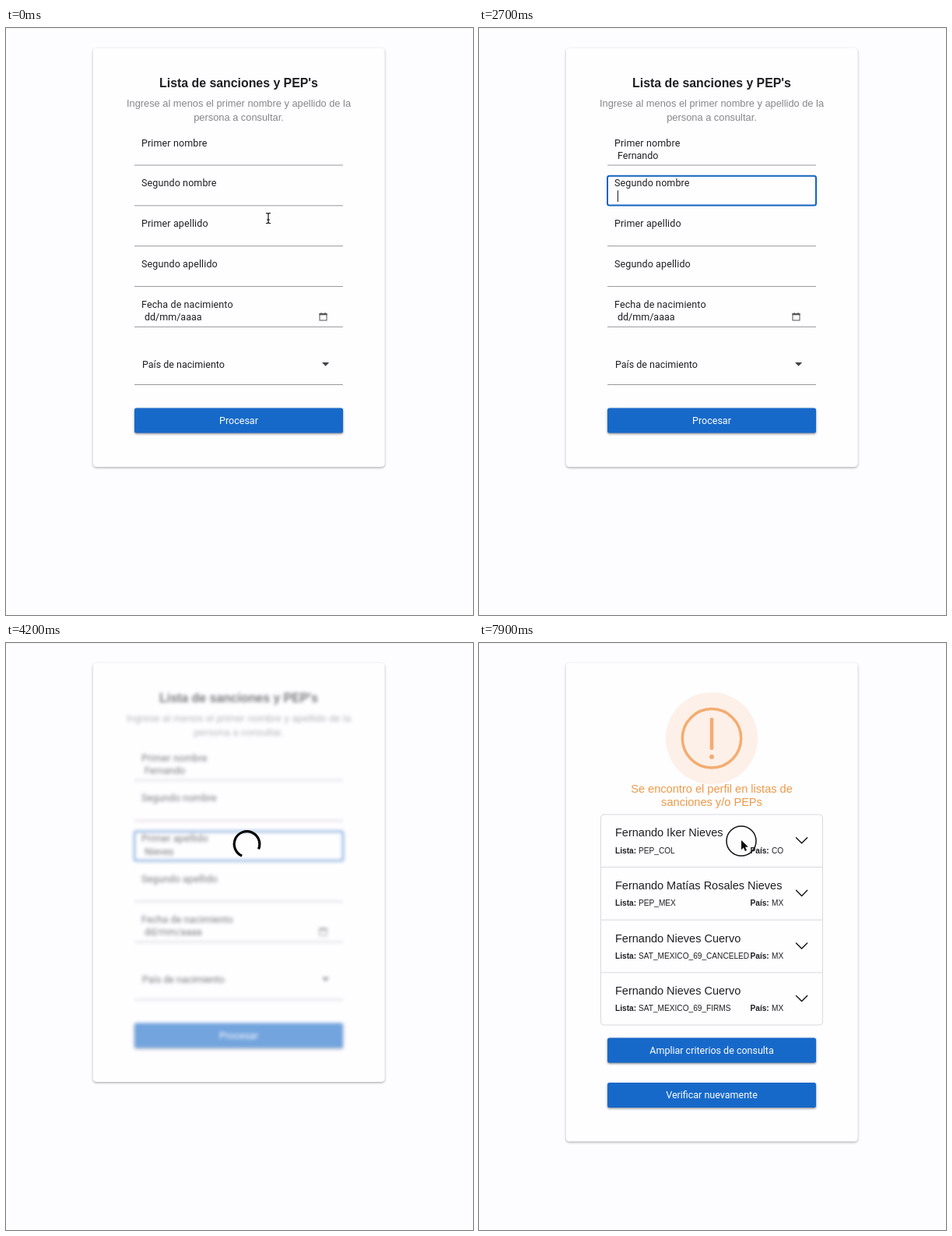
An HTML page with a canvas that plays this animation: 600 px wide and 753 px high, repeating every 8000 ms.

```html
<!DOCTYPE html>
<html lang="es">
<head>
<meta charset="utf-8">
<title>Lista de sanciones</title>
<style>
html, body { margin: 0; width: 100%; height: 100%; overflow: hidden; background: #fdfcff; }
canvas { display: block; width: 600px; height: 753px; }
</style>
</head>
<body>
<canvas id="stage"></canvas>
<script>
const W = 600, H = 753, LOOP = 8000, STEP = 100;
const BG = '#fdfcff', BLUE = '#1769c9', INK = '#1f1f21', ORANGE = '#f4ac70';
const SANS = '"Liberation Sans", Arial, sans-serif';
const ROBOTO = '12.5px Roboto, sans-serif';
const INTER = 'Inter, sans-serif';
const PITCH = 51.85;

const dpr = window.devicePixelRatio || 1;
const stage = document.getElementById('stage');
const sheet = document.createElement('canvas');
for (const c of [stage, sheet]) {
  c.width = W * dpr;
  c.height = H * dpr;
  c.getContext('2d').scale(dpr, dpr);
}
const main = stage.getContext('2d');
let g = main;

const first = { word: 'Fernando', keys: [1600, 1700, 1900, 2000, 2100, 2200, 2400, 2500], focus: 700 };
const last = { word: 'Nieves', keys: [3300, 3500, 3600, 3700, 3800, 3900], focus: 2900 };
const T = { click: 500, list: 800, second: 2700, sideList: 3000, load: 4100, result: 6300, arrow: 6700, press: 7800 };

const people = [
  ['Fernando', 'Fernando Nieves'],
  ['Tomás', 'Tomás Peñalver'],
  ['Raúl', 'Raúl Nieves'],
  ['Fer', 'Fer Nieves'],
  ['Mariela', 'Mariela Cortés'],
  ['Fito', 'Fito Olmedo'],
  ['Antonella', 'Antonella Prieto'],
  ['Ramiro', 'Ramiro Salazar'],
  ['Raúl Fernando', 'Raúl Fernando Nieves El...']
];
const byLetter = [people[0], people[3], people[5]];
const surname = [['Nilson', 'Nilson Vargas']];

const hits = [
  ['Fernando Iker Nieves', 'PEP_COL', 'CO'],
  ['Fernando Matías Rosales Nieves', 'PEP_MEX', 'MX'],
  ['Fernando Nieves Cuervo', 'SAT_MEXICO_69_CANCELED', 'MX'],
  ['Fernando Nieves Cuervo', 'SAT_MEXICO_69_FIRMS', 'MX']
];

function text(s, x, y, font, color, align = 'left', spacing = 0) {
  g.font = font;
  g.fillStyle = color;
  g.textAlign = align;
  g.letterSpacing = spacing + 'px';
  g.fillText(s, x, y);
}

function line(points, color, width, cap = 'butt') {
  g.beginPath();
  points.forEach(([x, y]) => g.lineTo(x, y));
  g.strokeStyle = color;
  g.lineWidth = width;
  g.lineCap = cap;
  g.stroke();
}

function box(x, y, w, h, r) {
  g.beginPath();
  g.roundRect(x, y, w, h, r);
}

function poly(points, color) {
  g.beginPath();
  points.forEach(([x, y]) => g.lineTo(x, y));
  g.closePath();
  g.fillStyle = color;
  g.fill();
}

function disc(x, y, r, color) {
  g.beginPath();
  g.arc(x, y, r, 0, 7);
  g.fillStyle = color;
  g.fill();
}

function ring(x, y, r, color, width) {
  g.beginPath();
  g.arc(x, y, r, 0, 7);
  g.strokeStyle = color;
  g.lineWidth = width;
  g.stroke();
}

function shadow(color, blur, dy) {
  g.shadowColor = color;
  g.shadowBlur = blur * dpr;
  g.shadowOffsetY = dy * dpr;
}

function raised(x, y, w, h, r, fill, alpha) {
  g.save();
  shadow(`rgba(0,0,0,${alpha})`, 3, 1.3);
  box(x, y, w, h, r);
  g.fillStyle = fill;
  g.fill();
  g.restore();
}

function button(label, y) {
  raised(165, y, 268, 32, 2.5, BLUE, 0.45);
  text(label, 299, y + 20, ROBOTO, '#fff', 'center');
}

const typed = (f, t) => f.word.slice(0, f.keys.filter(k => k <= t).length);

function caretOn(f, t) {
  const since = Math.max(f.focus, ...f.keys.filter(k => k <= t));
  return (t - since) % 1000 < 500;
}

function focusBox(row) {
  box(165, 138 + row * PITCH, 268, 37.6, 2.5);
  g.strokeStyle = '#1263bd';
  g.lineWidth = 2;
  g.stroke();
}

function value(f, row, t, active) {
  const s = typed(f, t), y = 168 + row * PITCH;
  text(s, 178, y, ROBOTO, INK);
  if (!active || !caretOn(f, t)) return;
  const x = 178.4 + g.measureText(s).width;
  line([[x, y - 11.5], [x, y + 3]], '#111', 1);
}

function form(t) {
  text("Lista de sanciones y PEP's", 299, 76, 'bold 15.87px ' + SANS, INK, 'center');
  text('Ingrese al menos el primer nombre y apellido de la', 299, 101.4, '12.83px ' + SANS, '#868588', 'center');
  text('persona a consultar.', 299, 118.9, '12.83px ' + SANS, '#868588', 'center');

  const active = t < first.focus ? -1 : t < T.second ? 0 : t < last.focus ? 1 : 2;
  ['Primer nombre', 'Segundo nombre', 'Primer apellido', 'Segundo apellido', 'Fecha de nacimiento'].forEach((s, i) => {
    const y = i * PITCH;
    if (i === active) focusBox(i);
    else line([[165, 176 + y], [433, 176 + y]], '#99989b', 1);
    text(s, 174, 151.6 + y, ROBOTO, INK, 'left', 0.12);
  });
  value(first, 0, t, active === 0);
  value(last, 2, t, active === 2 && t < T.load);
  if (active === 1) line([[178.4, 208.4], [178.4, 223]], '#111', 1);

  text('dd/mm/aaaa', 178, 375, ROBOTO, INK);
  g.strokeStyle = '#555';
  g.lineWidth = 1;
  g.strokeRect(403, 366.5, 9, 8.5);
  line([[402.5, 367.3], [412.5, 367.3]], '#555', 2);
  line([[405, 365], [405, 367]], '#555', 1.2);
  line([[410, 365], [410, 367]], '#555', 1.2);

  text('País de nacimiento', 175, 435.8, ROBOTO, INK);
  poly([[406, 429], [415.2, 429], [410.6, 433.8]], '#404042');
  line([[165, 457.5], [433, 457.5]], '#99989b', 1);
  button('Procesar', 487.5);
}

function person(x, y) {
  const c = '#a0a1a5';
  ring(x, y, 5.5, c, 1.2);
  disc(x, y - 1.5, 2, c);
  g.beginPath();
  g.ellipse(x, y + 3.6, 3.6, 2, 0, Math.PI, 0);
  g.fillStyle = c;
  g.fill();
}

function popup(x, y, w, h, rows, side) {
  const fill = '#212225', end = y + h;
  g.save();
  shadow('rgba(0,0,0,.3)', 9, 3);
  box(x, y, w, h, 4);
  g.fillStyle = fill;
  g.fill();
  g.restore();
  poly(side ? [[x + 1, y + 11], [x - 7, y + 19], [x + 1, y + 27]]
            : [[x + 10, y + 1], [x + 18.5, y - 7], [x + 27, y + 1]], fill);

  g.save();
  g.beginPath();
  g.rect(x, y, w, h - 44);
  g.clip();
  rows.forEach(([name, full], i) => {
    const top = y + i * PITCH;
    person(x + 18, top + 29.3);
    text(name, x + 36, top + 24.2, '11.7px ' + INTER, '#f2f2f4');
    text(full, x + 36, top + 43, '10.7px ' + INTER, '#97989c');
  });
  g.restore();
  line([[x, end - 40], [x + w, end - 40]], '#3a3b3f', 1);
  disc(x + 18, end - 19.8, 6, '#97989c');
  text('Administrar...', x + 36, end - 15.8, '11.4px ' + INTER, '#97989c');
}

function lists(t) {
  const a = typed(first, t), b = typed(last, t);
  if (t >= T.list && t < T.second) {
    if (!a) popup(253.5, 183, 200, 498, people);
    else {
      const rows = byLetter.filter(p => p[0].startsWith(a));
      popup(253.5, 183, 150.5, 47.4 + rows.length * PITCH, rows);
    }
  }
  if (t >= T.sideList && t < T.load) {
    if (!b) popup(440, 241, 200, 498, people, true);
    else if (b.length < 3) popup(253.5, 287, 128.5, 99, surname);
  }
}

function spinner(t) {
  const a = (185 + (t - 5400) * 0.36) * Math.PI / 180;
  g.beginPath();
  g.arc(309.5, 258, 16.3, a, a + Math.PI * 1.5);
  g.strokeStyle = '#000';
  g.lineWidth = 3.2;
  g.lineCap = 'butt';
  g.stroke();
}

function loading(t) {
  g = sheet.getContext('2d');
  g.clearRect(0, 0, W, H);
  form(t);
  g = main;
  g.save();
  g.filter = `blur(${2.3 * dpr}px)`;
  g.globalAlpha = 0.6;
  g.drawImage(sheet, 0, 0, W, H);
  g.restore();
  spinner(t);
}

function alertIcon(t) {
  const x = 299, y = 122.3;
  const r = 39 + (t - 7100) * 0.025;
  const alpha = 0.2 - (t - 7100) * 0.00006;
  disc(x, y, r, `rgba(246,170,105,${Math.min(0.24, alpha)})`);
  ring(x, y, 37.7, ORANGE, 3.5);
  line([[x, 98], [x, 135]], ORANGE, 4.6, 'round');
  disc(x, 146, 3, ORANGE);
}

function results(t) {
  alertIcon(t);
  text('Se encontro el perfil en listas de', 299, 191.5, '14.6px ' + SANS, '#ec9a48', 'center');
  text('sanciones y/o PEPs', 299, 208.6, '14.6px ' + SANS, '#ec9a48', 'center');

  box(156.5, 220, 285, 270, 4);
  g.strokeStyle = '#d8dade';
  g.lineWidth = 1;
  g.stroke();
  hits.forEach(([name, list, land], i) => {
    const y = 220 + i * 67.6;
    if (i) line([[156.5, y], [441.5, y]], '#d8dade', 1);
    const bold = 'bold 10.15px ' + SANS, thin = '10.15px ' + SANS;
    text(name, 175, y + 28.3, '14.5px ' + SANS, INK);
    text('Lista:', 175, y + 49.5, bold, INK);
    text(list, 205, y + 49.5, thin, INK);
    text('País:', 348.5, y + 49.5, bold, INK);
    text(land, 376, y + 49.5, thin, INK);
    line([[407.5, y + 29.7], [414.6, y + 36.8], [421.7, y + 29.7]], '#111', 1.4, 'round');
  });
  button('Ampliar criterios de consulta', 506.5);
  button('Verificar nuevamente', 564);
}

// Eased position between two points during [from, to]
function glide(t, from, to, p, q) {
  const k = Math.min(1, Math.max(0, (t - from) / (to - from)));
  const e = k * k * (3 - 2 * k);
  return [p[0] + (q[0] - p[0]) * e, p[1] + (q[1] - p[1]) * e];
}

function beam([x, y]) {
  const shape = [[[x - 3, y - 6.5], [x - 1, y - 6.5], [x, y - 5.5], [x + 1, y - 6.5], [x + 3, y - 6.5]],
    [[x, y - 5.5], [x, y + 5.5]],
    [[x - 3, y + 6.5], [x - 1, y + 6.5], [x, y + 5.5], [x + 1, y + 6.5], [x + 3, y + 6.5]],
    [[x - 1.8, y + 2], [x + 1.8, y + 2]]];
  shape.forEach(s => line(s, '#111', 1.2));
}

function arrow([x, y]) {
  const pts = [[0, 0], [0, 12.2], [2.9, 9.6], [4.9, 14], [7, 13.1], [5.1, 8.8], [8.8, 8.6]]
    .map(([a, b]) => [x + a, y + b]);
  g.lineJoin = 'round';
  line([...pts, pts[0]], '#fff', 1.8);
  poly(pts, '#0b0b0b');
  g.lineJoin = 'miter';
}

function pointer(t) {
  if (t < first.keys[0]) {
    const p = glide(t, 0, 400, [337, 244], [297, 160]);
    if (t >= T.click && t < T.list) ring(p[0], p[1], 19, '#111', 1.5);
    beam(p);
  } else if (t >= T.arrow) {
    const p = t < 7400 ? glide(t, T.arrow, 7100, [337, 244], [314, 168])
                       : glide(t, 7400, 7800, [314, 168], [337, 253]);
    if (t >= T.press) ring(337, 254, 19, '#111', 1.5);
    arrow(p);
  }
}

function draw(t) {
  g = main;
  g.fillStyle = BG;
  g.fillRect(0, 0, W, H);
  g.fillStyle = '#f1f0f3';
  g.fillRect(0, 0, W, 1);
  const done = t >= T.result;
  raised(111.7, 25.5, 375, done ? 614 : 537.5, 4.5, '#fefdff', 0.32);
  if (done) results(t);
  else if (t >= T.load) loading(t);
  else {
    form(t);
    lists(t);
  }
  pointer(t);
}

let start = null;
function tick(now) {
  if (start === null) start = now;
  draw(Math.floor(((now - start) % LOOP) / STEP) * STEP);
  requestAnimationFrame(tick);
}
draw(0);
requestAnimationFrame(tick);
</script>
</body>
</html>
```
